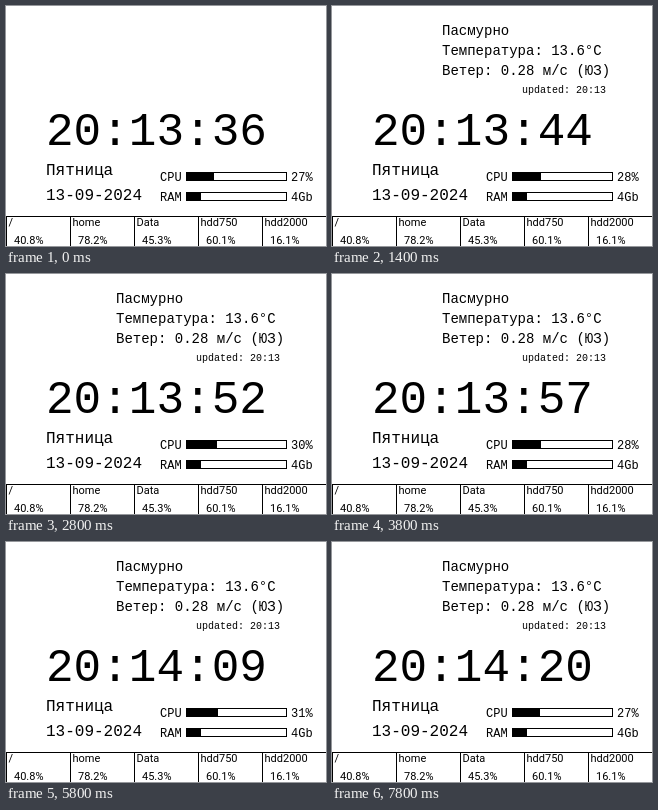
Animation, 320 px wide and 240 px high, one loop 8000 ms. Source, as an HTML page:

```html
<!DOCTYPE html>
<html lang="ru">
<head>
<meta charset="utf-8">
<title>Часы</title>
<style>
  html, body { margin: 0; width: 100%; height: 100%; overflow: hidden; background: #fff; }
  svg { display: block; width: 320px; height: 240px; font-family: "Liberation Mono", monospace; }
  text { white-space: pre; }
  .clock { font-size: 46px; }
  .date { font-size: 16px; }
  .weather { font-size: 14px; }
  .note { font-size: 10px; }
  .load { font-size: 12px; }
  .disks { font: 11px Roboto, sans-serif; }
  .frame { fill: none; stroke: #000; }
  #weather { animation: arrive 8s step-end infinite; }
  @keyframes arrive {
    0% { visibility: hidden; }
    12.5%, 100% { visibility: visible; }
  }
</style>
</head>
<body>
<svg viewBox="0 0 320 240">
  <g id="weather" class="weather">
    <text x="110" y="29">Пасмурно</text>
    <text x="110" y="49">Температура: 13.6°C</text>
    <text x="110" y="69">Ветер: 0.28 м/с (ЮЗ)</text>
    <text class="note" x="190" y="87">updated: 20:13</text>
  </g>
  <text id="clock" class="clock" x="40" y="139">20:13:36</text>
  <g class="date">
    <text x="40" y="169">Пятница</text>
    <text x="40" y="194">13-09-2024</text>
  </g>
  <g class="load">
    <text x="154" y="175">CPU</text>
    <rect class="frame" x="180.5" y="166.5" width="100" height="8"/>
    <rect id="cpuBar" x="180" y="166" width="28" height="9"/>
    <text id="cpuText" x="285" y="175">27%</text>
    <text x="154" y="195">RAM</text>
    <rect class="frame" x="180.5" y="186.5" width="100" height="8"/>
    <rect x="180" y="186" width="15" height="9"/>
    <text x="285" y="195">4Gb</text>
  </g>
  <path class="frame" d="M0 210.5H320M.5 210V240M64.5 210V240M128.5 210V240M192.5 210V240M256.5 210V240"/>
  <g id="disks" class="disks"></g>
</svg>
<script>
  const LOOP = 8000, STEP = 200;
  const START = (20 * 60 + 13) * 60 + 36;
  const CPU = [27, 28, 30, 28, 27, 31, 27];
  const DISKS = [['/', 40.8], ['home', 78.2], ['Data', 45.3], ['hdd750', 60.1], ['hdd2000', 16.1]];
  const byId = id => document.getElementById(id);
  const pad = n => String(n).padStart(2, '0');

  byId('disks').innerHTML = DISKS.map(([name, used], i) =>
    `<text x="${64 * i + 2.5}" y="220">${name}</text><text x="${64 * i + 8}" y="238">${used}%</text>`
  ).join('');

  const clock = byId('clock'), cpuBar = byId('cpuBar'), cpuText = byId('cpuText');
  const weather = byId('weather').getAnimations()[0];
  weather.startTime = 0;

  let shown = -1;
  function draw() {
    const step = Math.floor(performance.now() % LOOP / STEP);
    if (step !== shown) {
      shown = step;
      // The clock gains slightly more than one second per step.
      const time = START + Math.floor(0.6 + 1.12 * step);
      clock.textContent = [time / 3600, time / 60 % 60, time % 60].map(n => pad(Math.floor(n))).join(':');
      const cpu = CPU[Math.floor((step + 5) / 6.5)];
      cpuText.textContent = cpu + '%';
      cpuBar.setAttribute('width', cpu + 1);
    }
    requestAnimationFrame(draw);
  }
  draw();
</script>
</body>
</html>
```
